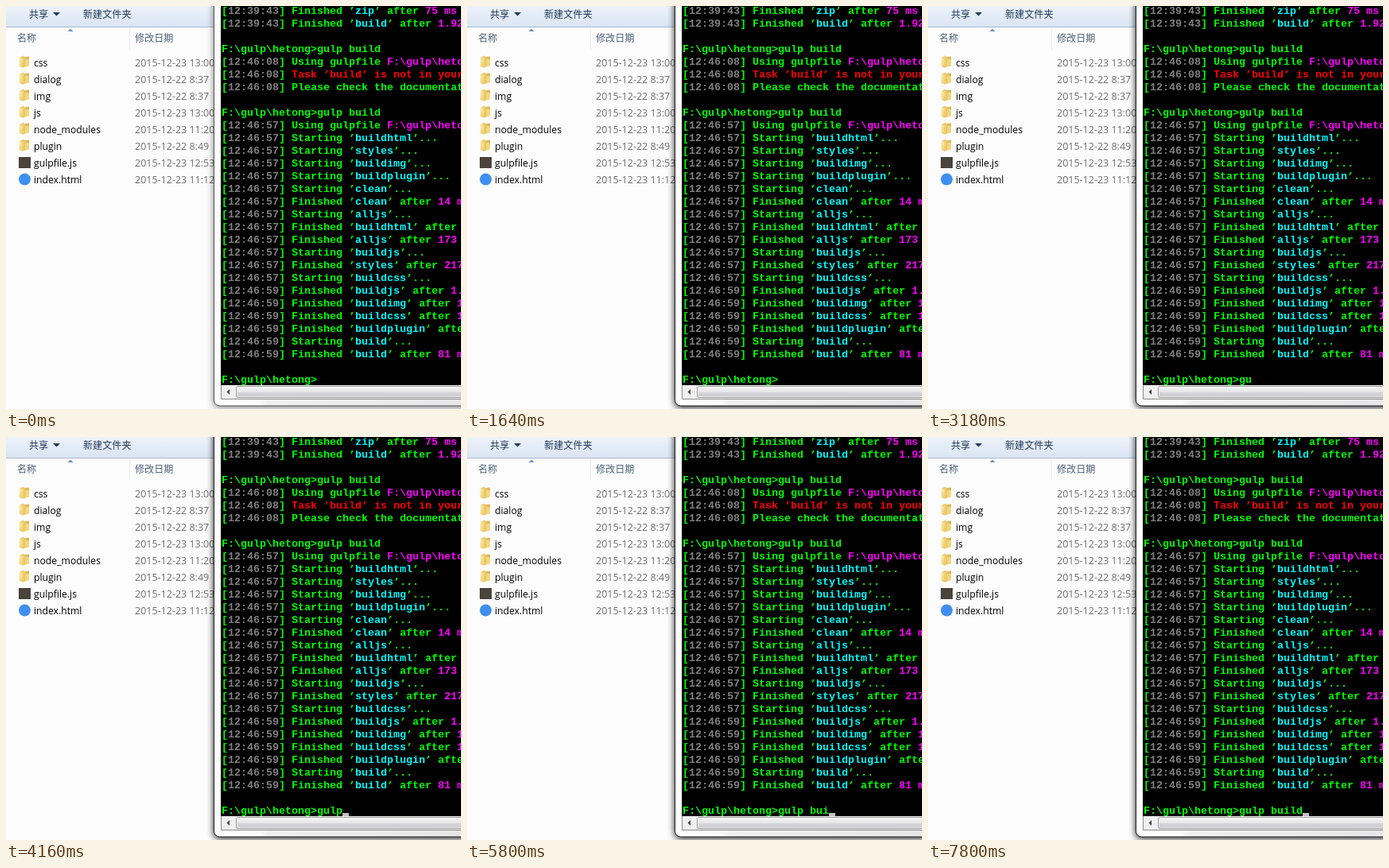
Write an HTML page that moves like this. It is 572 px wide and 507 px high and loops after 8 s.

```html
<!DOCTYPE html>
<html lang="zh">
<head>
<meta charset="utf-8">
<title>Gulp build</title>
<style>
  html, body { margin: 0; width: 100%; height: 100%; overflow: hidden; background: #fcfcfc; }
  svg { display: block; width: 572px; height: 507px; }
  text { white-space: pre; }
  .ui { font: 12.2px "Open Sans", "Noto Sans", sans-serif; fill: #000; }
  .cjk { font: 12.1px "Noto Sans CJK SC", "Noto Sans CJK", sans-serif; }
  .bar { fill: #1e395b; }
  .head { fill: #4c607a; }
  .date { font-size: 12.5px; fill: #6d6d6d; }
  .term { font: bold 13.33px "Liberation Mono", "Courier New", monospace; fill: #0f0; }
  .time { fill: #808080; }
  .task { fill: #0ff; }
  .value { fill: #f0f; }
  .error { fill: #f00; }
</style>
</head>
<body>
<svg viewBox="0 0 572 507">
  <defs>
    <linearGradient id="toolbar" x2="0" y2="1">
      <stop offset="0" stop-color="#eef3fa"/>
      <stop offset=".45" stop-color="#e4ecf7"/>
      <stop offset="1" stop-color="#dae5f3"/>
    </linearGradient>
    <linearGradient id="folderBack" x2="1" y2="0">
      <stop offset="0" stop-color="#f3dc8c"/>
      <stop offset="1" stop-color="#dcb04a"/>
    </linearGradient>
    <linearGradient id="folderFront" x2="1" y2="1">
      <stop offset="0" stop-color="#fdf0b4"/>
      <stop offset="1" stop-color="#ecc762"/>
    </linearGradient>
    <linearGradient id="thumb" x2="0" y2="1">
      <stop offset="0" stop-color="#f6f6f6"/>
      <stop offset=".5" stop-color="#e6e6e8"/>
      <stop offset=".52" stop-color="#d6d6d9"/>
      <stop offset="1" stop-color="#cacace"/>
    </linearGradient>
    <linearGradient id="glass" x2="1" y2="0">
      <stop offset="0" stop-color="#fff"/>
      <stop offset=".17" stop-color="#fafafa"/>
      <stop offset=".2" stop-color="#f0f0f0"/>
      <stop offset="1" stop-color="#e6e6e8"/>
    </linearGradient>
    <filter id="blur" x="-10%" y="-10%" width="120%" height="120%">
      <feGaussianBlur stdDeviation="4.5"/>
    </filter>
    <g id="folder">
      <path d="M2 2.5 L7 .5 L8 2 L14 1.5 V13 L6 15.5 L2 14Z" fill="url(#folderBack)"/>
      <path d="M1.5 3 L6.5 4.5 V15.7 L1.5 14Z" fill="url(#folderFront)"/>
      <path d="M9 5 H14 V13 L9 14.5Z" fill="#f3d678"/>
    </g>
  </defs>

  <rect width="572" height="507" fill="#fcfcfc"/>
  <rect width="572" height="26" fill="url(#toolbar)"/>
  <path d="M0 26.5H572" stroke="#a9b8cc"/>
  <path d="M155.5 28V55" stroke="#e8edf3"/>
  <path d="M59 8H68L63.5 12.5Z" fill="#1e395b"/>
  <path d="M77.5 32H84.5L81 28.5Z" fill="#6f95b5"/>
  <g class="cjk">
    <text class="bar" x="29" y="15">共享</text>
    <text class="bar" x="97" y="15">新建文件夹</text>
    <text class="head" x="14" y="45">名称</text>
    <text class="head" x="162" y="45">修改日期</text>
  </g>
  <g id="files" class="ui"></g>

  <rect id="shadow" x="261" y="-30" width="360" height="535" rx="7" filter="url(#blur)"/>
  <rect id="frame" x="261.5" y="-20" width="340" height="523" rx="7" fill="url(#glass)"/>
  <path d="M270.5 0V494.5H572" fill="none" stroke="#8a8a8a"/>
  <rect x="270" width="302" height="477" fill="#000"/>

  <rect x="271" y="477" width="301" height="17" fill="#f0f0f0"/>
  <path d="M281 482V489L277.5 485.5Z" fill="#444"/>
  <rect x="289.5" y="478.5" width="320" height="14" rx="2" fill="url(#thumb)" stroke="#979797"/>
  <rect x="290.5" y="479.5" width="318" height="12" rx="1" fill="none" stroke="#fff" stroke-opacity=".6"/>

  <g id="term" class="term"></g>
  <rect id="cursor" y="473" width="8" height="4" fill="#c0c0c0"/>
</svg>
<script>
const $ = id => document.getElementById(id);
const LEFT = 271, CELL = 8, ROW = 16;
const PROMPT = 'F:\\gulp\\hetong>', COMMAND = 'gulp build';
const span = (cls, s) => `<tspan class="${cls}">${s}</tspan>`;

// Explorer list
const files = [
  ['css', '23 13:00'], ['dialog', '22 8:37'], ['img', '22 8:37'], ['js', '23 13:00'],
  ['node_modules', '23 11:20'], ['plugin', '22 8:49'],
  ['gulpfile.js', '23 12:53'], ['index.html', '23 11:12']
];
const icon = (name, y) =>
  name === 'gulpfile.js' ? `<rect x="16" y="${y - 7}" width="15" height="14" fill="#49433c"/>` :
  name === 'index.html' ? `<circle cx="23.5" cy="${y}" r="7.5" fill="#3f8ff0"/>` :
  `<use href="#folder" x="15" y="${y - 9}"/>`;
$('files').innerHTML = files.map(([name, day], i) => {
  const y = 71 + 21 * i;
  return icon(name, y) +
    `<text x="35" y="${y + 4.5}">${name}</text>` +
    `<text class="date" x="162" y="${y + 4.5}">2015-12-${day}</text>`;
}).join('');

// Console log
const stamp = (time, s) => `[${span('time', time)}] ${s}`;
const task = name => `’${span('task', name)}’`;
const start = name => `Starting ${task(name)}...`;
const done = (name, took) => `Finished ${task(name)} after ${span('value', took)}`;
const using = 'Using gulpfile ' + span('value', 'F:\\gulp\\hetong\\gulpfile.js');
const at = (time, ...lines) => lines.map(s => stamp(time, s));

const lines = [
  ...at('12:39:43', done('zip', '75 ms'), done('build', '1.92 s')),
  '',
  PROMPT + COMMAND,
  ...at('12:46:08', using,
    span('error', 'Task ’build’ is not in your gulpfile'),
    'Please check the documentation for proper gulpfile formatting'),
  '',
  PROMPT + COMMAND,
  ...at('12:46:57', using,
    start('buildhtml'), start('styles'), start('buildimg'), start('buildplugin'),
    start('clean'), done('clean', '14 ms'), start('alljs'),
    done('buildhtml', '190 ms'), done('alljs', '173 ms'), start('buildjs'),
    done('styles', '217 ms'), start('buildcss')),
  ...at('12:46:59',
    done('buildjs', '1.5 s'), done('buildimg', '1.8 s'), done('buildcss', '1.6 s'),
    done('buildplugin', '1.9 s'), start('build'), done('build', '81 ms')),
  '',
  PROMPT
];
$('term').innerHTML = lines.map((s, i) =>
  `<text x="${LEFT}" y="${10 + ROW * i}">${s}</text>`).join('');
const input = $('term').lastElementChild;

// [time, typed characters, cursor visible]
const steps = [
  [0, 0, 0], [1020, 0, 1], [1640, 0, 0], [2100, 0, 1], [2560, 0, 0],
  [3180, 2, 0], [3640, 3, 1], [4040, 4, 0], [4160, 4, 1], [4410, 5, 0],
  [4660, 5, 1], [5190, 6, 1], [5560, 7, 1], [5680, 8, 0], [5800, 8, 1],
  [6260, 8, 0], [6570, 9, 0], [6880, 10, 1], [7340, 10, 0], [7800, 10, 1]
];
const LOOP = 8000, FOCUS = 560;

function draw(now) {
  const t = now % LOOP;
  const [, typed, on] = steps.filter(s => s[0] <= t).pop();
  const content = PROMPT + COMMAND.slice(0, typed);
  if (input.textContent !== content) input.textContent = content;
  $('cursor').setAttribute('x', LEFT + CELL * content.length);
  $('cursor').setAttribute('visibility', on ? 'visible' : 'hidden');
  const active = t >= FOCUS;
  $('shadow').setAttribute('opacity', active ? 0.9 : 0.5);
  $('frame').setAttribute('stroke', active ? '#222' : '#555');
}
const origin = performance.now();
function tick() {
  draw(performance.now() - origin);
  requestAnimationFrame(tick);
}
tick();
</script>
</body>
</html>
```
